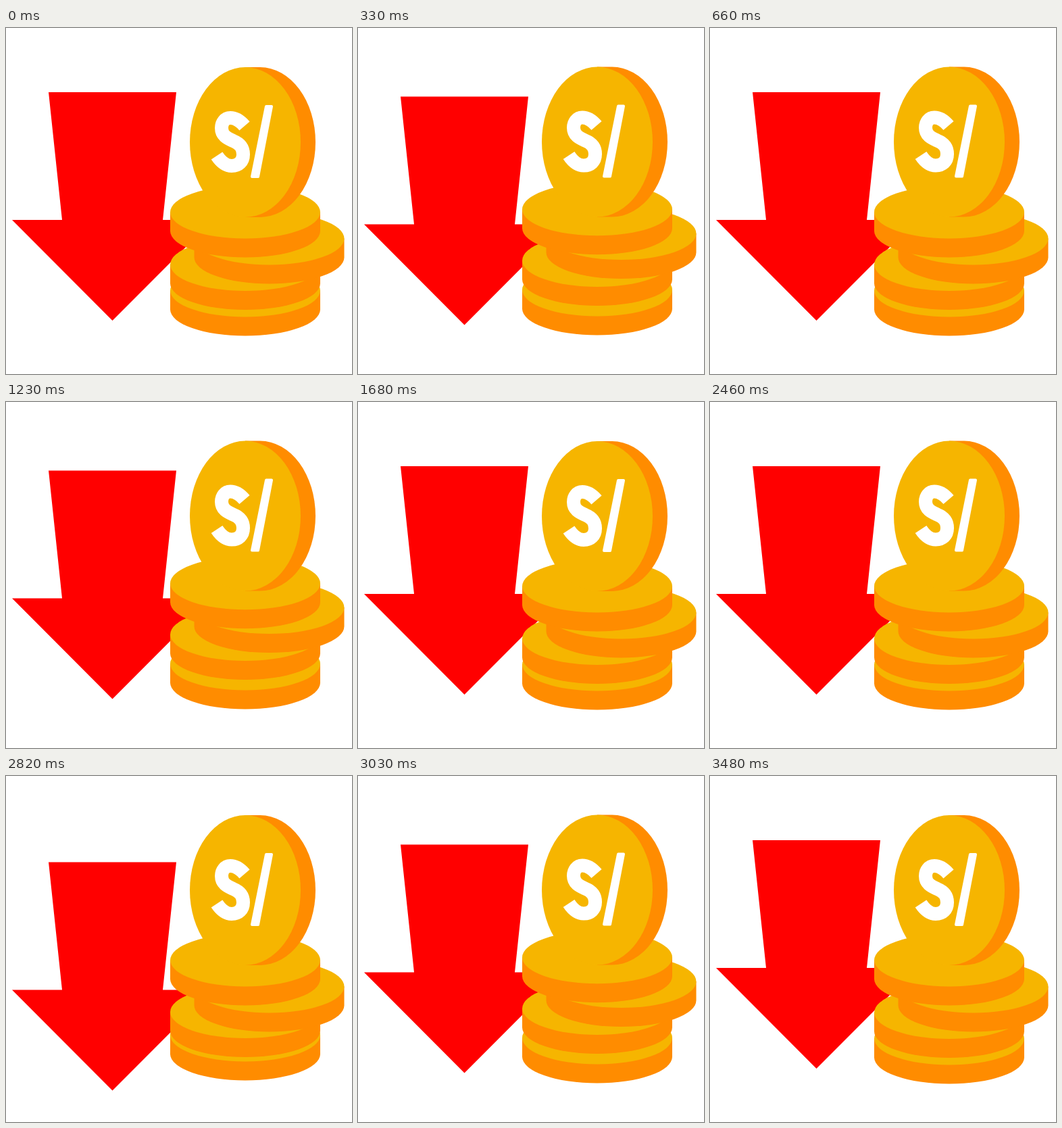
Write an HTML page that moves like this. It is 512x512 px and loops after 3600 ms.

```html
<!DOCTYPE html>
<html lang="es">
<meta charset="utf-8">
<title>Coins and arrow</title>
<style>
  html, body { margin: 0; width: 100%; height: 100%; overflow: hidden; background: #fff }
  svg { display: block; width: 100vw; height: 100vh }
  .face { fill: #f6b500 }
  .rim { fill: #ff8c00 }
</style>
<svg viewBox="0 0 512 512">
  <defs>
    <g id="coin">
      <path class="rim" d="M-111 0V28A111 39 0 0 0 111 28V0Z"/>
      <ellipse class="face" rx="111" ry="39"/>
    </g>
  </defs>
  <path id="arrow" fill="red" d="M63 95H252L232 284H306L157.5 433L9 284H83Z"/>
  <g class="hop"><use href="#coin" x="354" y="388.5"/></g>
  <g class="hop"><use href="#coin" x="354" y="350"/></g>
  <g class="hop"><use href="#coin" x="389.5" y="311.5"/></g>
  <g class="hop"><use href="#coin" x="354" y="272.5"/></g>
  <g class="hop">
    <path class="rim" d="M354 58H376A82 111 0 0 1 376 280H354Z"/>
    <ellipse class="face" cx="354" cy="169" rx="82" ry="111"/>
    <path fill="none" stroke="#fff" stroke-width="20" d="M353 145C347 138 340 133 332 133C324 133 319 140 319 148C319 159 327 163 336 167C346 171 351 177 351 187C351 198 344 204 334 204C326 204 318 198 312 189"/>
    <path fill="#fff" stroke="#fff" stroke-width="4" stroke-linejoin="round" d="M385 116H393L373 220H364Z"/>
  </g>
</svg>
<script>
const CYCLE = 900, STEP = 30, DELAY = 75;
const PEAK = 195, END = 560;
const arrow = document.getElementById('arrow');
const coins = document.querySelectorAll('.hop');

// Smooth rise to 1, then a quick fall with a long tail.
function pulse(t) {
  if (t <= 0 || t >= END) return 0;
  if (t < PEAK) return Math.sin(Math.PI / 2 * t / PEAK) ** 2;
  return 1 / (1 + ((t - PEAK) / 85) ** 4);
}

const shift = (el, y) => el.setAttribute('transform', `translate(0 ${y.toFixed(2)})`);

function draw(now) {
  const t = Math.min(780, Math.floor(now % CYCLE / STEP) * STEP);
  shift(arrow, 48 * pulse(t));
  coins.forEach((coin, i) => shift(coin, t < 780 ? -7.5 * pulse(t - i * DELAY) : 0));
}

const start = performance.now();
function tick() {
  draw(performance.now() - start);
  requestAnimationFrame(tick);
}
tick();
</script>
</html>
```
